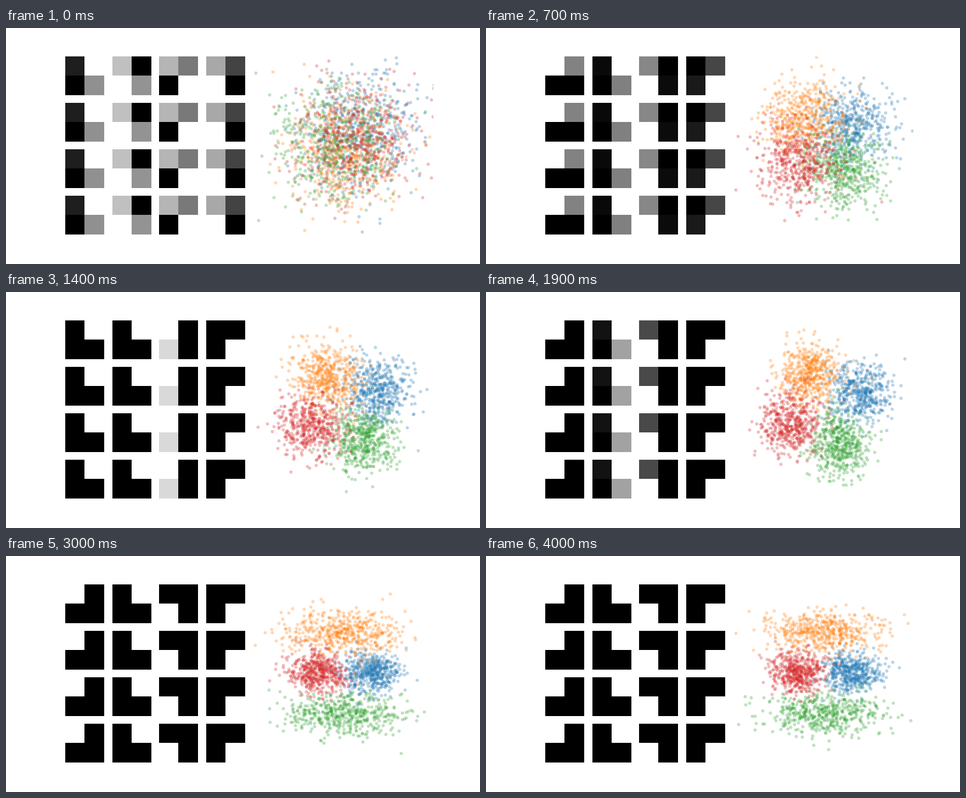
A matplotlib script that plays this animation: 864x432 px, repeating every 4.1 s.

```python
import numpy as np
import matplotlib.pyplot as plt
from matplotlib.animation import FuncAnimation

FRAMES = 41
STEP_MS = 100
POINTS = 500
CENTER = np.array([617, 213])

# Each cloud has a heading (degrees, y down) and a small offset at the start.
CLOUDS = [("tab:blue", 0, (25, -25)), ("tab:orange", -90, (1, 11)),
          ("tab:green", 90, (-19, 2)), ("tab:red", 180, (17, -8))]


def tiles(white, **greys):
    """Four black tiles with one white cell each; greys such as b3=128 leak in."""
    cells = 255 * np.eye(4)[list(white)]
    for name, level in greys.items():
        cells["abcd".index(name[0]), int(name[1])] = level
    return cells


# Tiles settle on one white cell each, in reading order.
STAGES = [
    (0, tiles((1, 2, 3, 2), a0=30, a3=144, b0=192, b3=147,
              c0=181, c1=122, d0=168, d1=67)),
    (7, tiles((0, 1, 2, 3), a1=130, b0=9, b3=128, c0=135, c3=11, d1=70, d2=26)),
    (14, tiles((1, 1, 0, 3), c2=217)),
    (19, tiles((0, 1, 2, 3), b0=18, b3=162, c0=74)),
    (26, tiles((0, 1, 2, 3))),
]


def tiles_at(frame):
    for (t0, first), (t1, second) in zip(STAGES, STAGES[1:]):
        if frame <= t1:
            return first + (second - first) * (frame - t0) / (t1 - t0)
    return STAGES[-1][1]


def cloud_at(frame, heading, offset):
    """Centre and spread: clouds part, turn upright, then two of them widen."""
    u = np.clip((frame - 19) / 7, 0, 1)
    settle = u * u * (3 - 2 * u)
    reach = 70 * (1 - np.exp(-frame / 4))
    spread = 26 + 28 * np.exp(-frame / 7)
    angle = np.radians(heading - (43 - frame) * (1 - settle))
    vertical = abs(heading) == 90

    squeeze = np.array([1 - 0.3 * settle, 1 + 0.06 * settle])
    center = CENTER + np.array(offset) * np.exp(-frame / 3)
    center = center + reach * squeeze * [np.cos(angle), np.sin(angle)]
    size = [spread + 27 * settle * vertical, spread * (1 - 0.27 * settle)]
    return center, size


fig = plt.figure(figsize=(12, 6), dpi=72, facecolor="white")
grid = fig.add_gridspec(4, 8, left=0.125, right=0.9, bottom=0.125, top=0.88,
                        wspace=0.2, hspace=0.2)

images = []
for row in range(4):
    for col in range(4):
        ax = fig.add_subplot(grid[row, col])
        ax.axis("off")
        images.append(ax.imshow(np.zeros((2, 2)), cmap="gray", vmin=0,
                                vmax=255, interpolation="nearest"))

plot = fig.add_subplot(grid[:, 4:])
plot.axis("off")
box = plot.get_position()
plot.set_xlim(864 * box.x0, 864 * box.x1)
plot.set_ylim(432 * (1 - box.y0), 432 * (1 - box.y1))
dots = [plot.scatter([], [], s=36, c=color, alpha=0.3, linewidths=0)
        for color, _, _ in CLOUDS]


def update(frame):
    cells = tiles_at(frame)
    for i, image in enumerate(images):
        image.set_data(cells[i % 4].reshape(2, 2))
    rng = np.random.default_rng(100 + frame)
    for dot, (_, heading, offset) in zip(dots, CLOUDS):
        center, size = cloud_at(frame, heading, offset)
        dot.set_offsets(rng.normal(center, size, (POINTS, 2)))
    return images + dots


anim = FuncAnimation(fig, update, frames=FRAMES, interval=STEP_MS,
                     init_func=lambda: update(0), repeat=True, repeat_delay=0)
plt.show()
```
